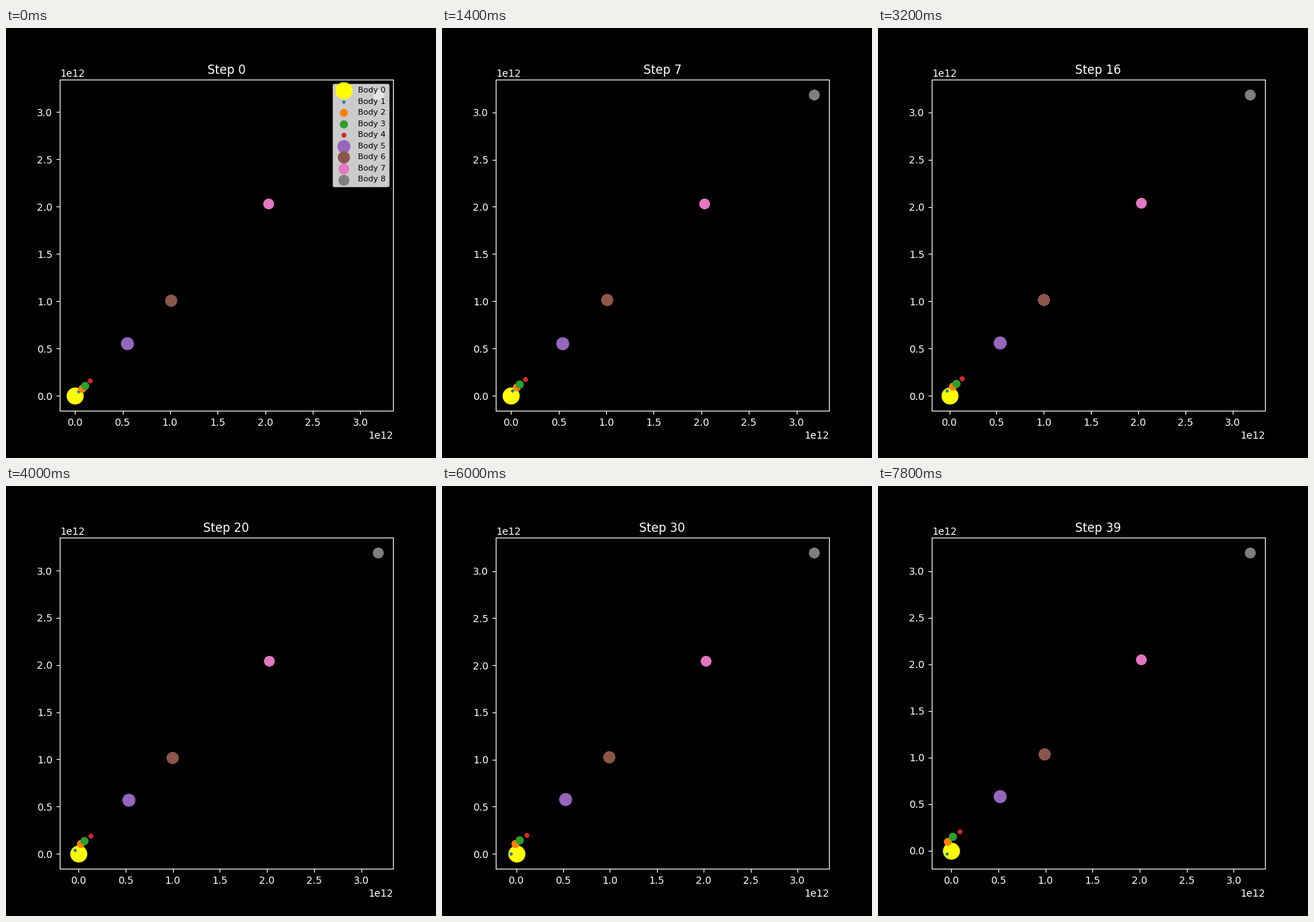
Write a matplotlib script that moves like this. It is 600 by 600 pixels and loops after 8000 ms.

```python
import numpy as np
import matplotlib.pyplot as plt
from matplotlib.animation import FuncAnimation

G = 6.674e-11
DAY = 86400
STEPS = 40

plt.rcParams.update({
    "font.family": "DejaVu Sans",
    "axes.facecolor": "black",
    "axes.edgecolor": "white",
    "axes.titlecolor": "white",
    "xtick.color": "white",
    "ytick.color": "white",
    "legend.facecolor": "white",
})

masses = np.array([1.989e30, 3.301e23, 4.867e24, 5.972e24, 6.417e23,
                   1.898e27, 5.683e26, 8.681e25, 1.024e26])
radii = np.array([0, 5.79e10, 1.082e11, 1.496e11, 2.279e11,
                  7.785e11, 1.427e12, 2.8745e12, 4.503e12])
colors = ["yellow"] + [f"C{i}" for i in range(8)]

# Marker area grows with the logarithm of the mass
log_mass = np.log10(masses)
sizes = 5 + 255 * (log_mass - log_mass.min()) / np.ptp(log_mass)


def acceleration(pos):
    diff = pos[None, :, :] - pos[:, None, :]
    dist = np.linalg.norm(diff, axis=2)
    np.fill_diagonal(dist, np.inf)
    return (G * masses[None, :, None] * diff / dist[..., None] ** 3).sum(axis=1)


def simulate():
    """Start on the diagonal with circular speeds, one step per day."""
    pos = np.outer(radii, [1, 1]) / np.sqrt(2)
    vel = np.zeros_like(pos)
    speed = np.sqrt(G * masses[0] / radii[1:])
    vel[1:] = np.outer(speed, [-1, 1]) / np.sqrt(2)
    track = []
    for _ in range(STEPS):
        vel = vel + acceleration(pos) * DAY
        pos = pos + vel * DAY
        track.append(pos)
    return track


track = simulate()
fig, ax = plt.subplots(figsize=(6, 6), dpi=100, facecolor="black")


def draw(step):
    ax.clear()
    for i, (x, y) in enumerate(track[step]):
        ax.scatter(x, y, s=sizes[i], color=colors[i], label=f"Body {i}")
    ax.set_title(f"Step {step}")
    if step == 0:
        ax.legend(loc="upper right", fontsize=8)


anim = FuncAnimation(fig, draw, frames=STEPS, interval=200,
                     init_func=lambda: draw(0), repeat=True, repeat_delay=0)
plt.show()
```
